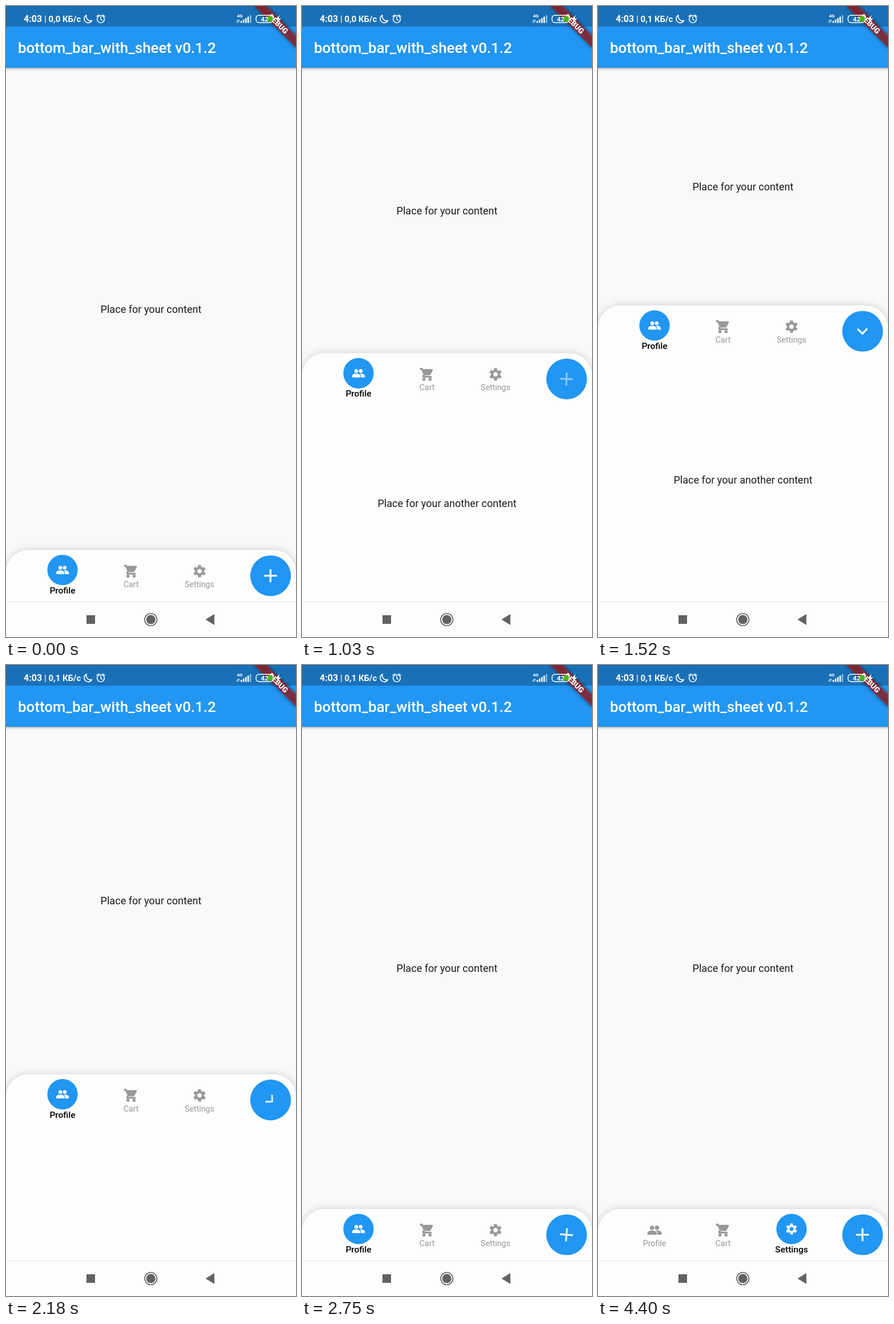
Write an HTML page that moves like this. It is 508x1102 px and loops after 4520 ms.

```html
<!DOCTYPE html>
<html lang="en">
<head>
<meta charset="utf-8">
<title>Bottom bar with sheet</title>
<style>
  html, body { margin: 0; width: 100%; height: 100%; overflow: hidden; background: #f9f9fa; }
  svg { display: block; width: 508px; height: 1102px; font-family: Roboto, "Noto Sans", sans-serif; }
  .mid { text-anchor: middle; }
  .body { font-size: 18.1px; fill: #1c1c1c; }
  .item { fill: #999; font-size: 14.2px; }
  .item .dot { fill: none; }
  .item.on { fill: #fff; font-size: 15.5px; font-weight: 500; }
  .item.on .dot { fill: #2196f3; }
  .item.on text { fill: #000; }
</style>
</head>
<body>
<svg viewBox="0 0 508 1102">
  <defs>
    <filter id="soft" x="-10%" y="-10%" width="120%" height="120%"><feGaussianBlur stdDeviation="7"/></filter>
    <filter id="bannerBlur" x="-30%" y="-100%" width="160%" height="300%"><feGaussianBlur stdDeviation="3"/></filter>
    <linearGradient id="barShade" x2="0" y2="1">
      <stop stop-color="#000" stop-opacity=".26"/>
      <stop offset=".4" stop-color="#000" stop-opacity=".1"/>
      <stop offset="1" stop-color="#000" stop-opacity="0"/>
    </linearGradient>
    <g id="people">
      <circle cx="8" cy="8" r="3"/><circle cx="16" cy="8" r="3"/>
      <path d="M8 13c-2.33 0-7 1.17-7 3.5V19h14v-2.5c0-2.33-4.67-3.5-7-3.5zM16 13c-.29 0-.62.02-.97.05 1.16.84 1.97 1.97 1.97 3.45V19h6v-2.5c0-2.33-4.67-3.5-7-3.5z"/>
    </g>
    <g id="cart">
      <circle cx="7" cy="20" r="2"/><circle cx="17" cy="20" r="2"/>
      <path d="M1 2v2h2l3.6 7.59-1.35 2.45c-.16.28-.25.61-.25.96 0 1.1.9 2 2 2h12v-2H7.42c-.14 0-.25-.11-.25-.25l.03-.12.9-1.63h7.45c.75 0 1.41-.41 1.75-1.03l3.58-6.49A1 1 0 0 0 20 4H5.21l-.94-2H1z"/>
    </g>
    <g id="gear"><circle cx="12" cy="12" r="5.4" fill="none" stroke-width="3.8"/></g>
  </defs>

  <rect width="508" height="1102" fill="#f9f9fa"/>
  <text id="content" class="body mid" x="254">Place for your content</text>

  <rect y="108" width="508" height="6" fill="url(#barShade)"/>
  <rect width="508" height="108" fill="#2196f3"/>
  <rect width="508" height="36" fill="#1a70b7"/>
  <text x="21" y="82" font-size="25.87" font-weight="500" fill="#fff">bottom_bar_with_sheet v0.1.2</text>

  <g transform="translate(508 0) rotate(45)">
    <rect x="-52" y="36.2" width="104" height="15.5" opacity=".5" filter="url(#bannerBlur)"/>
    <rect x="-52" y="36.2" width="104" height="15.5" fill="#b71c1c" fill-opacity=".63"/>
    <text class="mid" y="48.6" font-size="13.2" font-weight="900" fill="#fff">DEBUG</text>
  </g>

  <g fill="#fff">
    <text x="31" y="28" font-size="16" font-weight="700">4:03</text>
    <text id="speed" x="67" y="28" font-size="14.9" font-weight="700"></text>
    <g fill="none" stroke="#fff" stroke-width="1.6" stroke-linecap="round" stroke-linejoin="round">
      <path d="M141 16a7 7 0 1 0 9.3 9.3A7.2 7.2 0 0 1 141 16z"/>
      <circle cx="166" cy="23" r="6.3"/>
      <path d="M166 19.5V23.4l2.6 1.6M159.2 18.2l3-2.6M172.8 18.2l-3-2.6"/>
    </g>
    <text x="404.5" y="20" font-size="8" font-weight="700">4G</text>
    <path d="M405 24v5m-1.3-1.5L405 29l1.3-1.5M408 29v-5m-1.3 1.5L408 24l1.3 1.5" fill="none" stroke="#fff" stroke-width=".9"/>
    <g id="signal"></g>
    <rect x="438" y="16.3" width="30" height="12.6" rx="5" fill="none" stroke="#fff" stroke-width="1.5"/>
    <path d="M458 18h5.5a4 4 0 0 1 4 4v1.3a4 4 0 0 1-4 4H458z" fill="#4bb80c"/>
    <text x="446.5" y="26.8" font-size="11.5" font-weight="700">42</text>
    <path d="M479 16l-6.5 7h4l-2 6 7.5-7.5h-4z"/>
  </g>

  <g id="sheet">
    <rect y="950" width="508" height="640" rx="39" fill-opacity=".17" filter="url(#soft)"/>
    <rect y="950" width="508" height="640" rx="39" fill="#fdfdfd"/>
    <g id="items"></g>
    <circle cx="463.5" cy="995" r="35.6" fill="#2196f3"/>
    <g id="icon" fill="#fff">
      <path id="plus" d="M5 11h6V5h2v6h6v2h-6v6h-2v-6H5z"/>
      <path id="arrow" d="M7.41 8.59L12 13.17l4.59-4.58L18 10l-6 6-6-6z"/>
    </g>
  </g>
  <text id="extra" class="body mid" x="254">Place for your another content</text>

  <rect y="1040" width="508" height="62" fill="#fdfdfd"/>
  <rect y="1040" width="508" height="1.3" fill="#e9e9e9"/>
  <g fill="#626262">
    <rect x="141" y="1064" width="15" height="15"/>
    <circle cx="253.7" cy="1071.5" r="8"/>
    <circle cx="253.7" cy="1071.5" r="10.7" fill="none" stroke="#626262" stroke-width="1.6"/>
    <path d="M349.5 1071.5l15.5-9.4v18.8z"/>
  </g>
</svg>
<script>
const LOOP = 4520, CLOSED = 950, OPEN = 523;
const SLIDE = 500, SPIN = 700;
const OPEN_AT = 826, FIRST_MOVE = 950, CLOSE_AT = 2095;
const CART_AT = 3250, SETTINGS_AT = 3780, SPEED_AT = 1440;
const $ = id => document.getElementById(id);
const clamp = x => Math.min(1, Math.max(0, x));

function bezier(x1, y1, x2, y2) {
  const at = (a, b, s) => 3 * (1 - s) ** 2 * s * a + 3 * (1 - s) * s * s * b + s ** 3;
  return x => {
    if (x <= 0 || x >= 1) return clamp(x);
    let lo = 0, hi = 1;
    for (let i = 0; i < 24; i++) {
      const m = (lo + hi) / 2;
      if (at(x1, x2, m) < x) lo = m; else hi = m;
    }
    return at(y1, y2, lo);
  };
}
const easeOut = bezier(0.215, 0.61, 0.355, 1);

$('gear').innerHTML += Array.from({ length: 6 }, (_, i) =>
  `<path d="M9.7 2h4.6l.6 4.6h-5.8z" stroke="none" transform="rotate(${i * 60} 12 12)"/>`).join('');
$('signal').innerHTML = Array.from({ length: 5 }, (_, i) =>
  `<rect x="${411 + i * 4}" y="${26 - i * 2.5}" width="2.5" height="${3.5 + i * 2.5}" opacity="${i > 3 ? 0.5 : 1}"/>`).join('');

const items = [['Profile', 'people', 99], ['Cart', 'cart', 219], ['Settings', 'gear', 339]].map(([label, icon, x]) => {
  const g = document.createElementNS('http://www.w3.org/2000/svg', 'g');
  g.innerHTML = `<circle class="dot" cx="${x}" cy="985" r="26.6"/><use href="#${icon}"/><text class="mid" x="${x}">${label}</text>`;
  $('items').append(g);
  return { g, x, use: g.querySelector('use'), text: g.querySelector('text') };
});

function select(index) {
  items.forEach(({ g, x, use, text }, i) => {
    const on = i === index, k = (on ? 23.3 : 25.9) / 24;
    g.setAttribute('class', on ? 'item on' : 'item');
    use.setAttribute('stroke', on ? '#fff' : '#999');
    use.setAttribute('transform', `translate(${x} ${on ? 985 : 987}) scale(${k}) translate(-12 -12)`);
    text.setAttribute('y', on ? 1026 : 1015);
  });
}

function draw(t) {
  const closing = t >= CLOSE_AT;
  const moving = t >= FIRST_MOVE;
  const shown = closing ? 1 - easeOut((t - CLOSE_AT) / SLIDE)
    : moving ? easeOut((t - OPEN_AT) / SLIDE) : 0;
  const top = CLOSED + (OPEN - CLOSED) * shown;
  $('sheet').setAttribute('transform', `translate(0 ${top - CLOSED})`);
  $('content').setAttribute('y', (top + 108) / 2 + 6.5);
  $('extra').setAttribute('y', (top + 91 + 1040) / 2 + 6.5);
  $('extra').setAttribute('visibility', moving && !closing ? 'visible' : 'hidden');

  // The main icon spins one turn while plus and arrow swap.
  const v = closing ? 1 - clamp((t - CLOSE_AT) / SPIN)
    : t >= 900 ? clamp((t - OPEN_AT) / SPIN) : 0;
  const angle = moving ? 360 * clamp((v - 0.05) / 0.95) : 0;
  $('icon').setAttribute('transform', `translate(463.3 995) rotate(${angle}) scale(1.617) translate(-12 -12)`);
  $('plus').setAttribute('opacity', clamp(1 - v / 0.56));
  $('arrow').setAttribute('opacity', clamp(1 - (1 - v) / 0.56));

  $('speed').textContent = `| 0,${t < SPEED_AT ? 0 : 1} КБ/с`;
  select(t < CART_AT ? 0 : t < SETTINGS_AT ? 1 : 2);
}

const start = performance.now();
function tick() {
  draw((performance.now() - start) % LOOP);
  requestAnimationFrame(tick);
}
tick();
</script>
</body>
</html>
```
